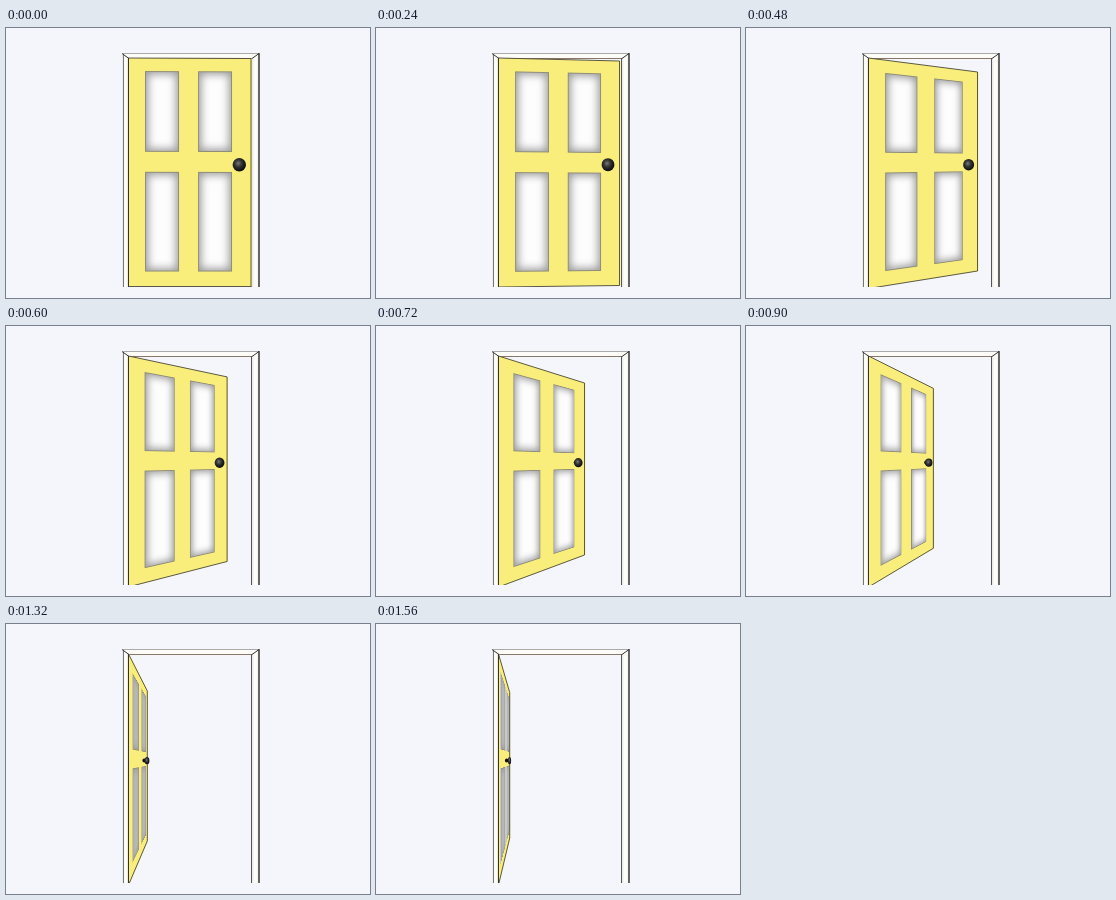
An HTML page that plays this animation: 364 px wide and 270 px high, repeating every 2.22 s.

```html
<!DOCTYPE html>
<html lang="en">
<head>
<meta charset="utf-8">
<title>Opening door</title>
<style>
  html, body { margin: 0; width: 100%; height: 100%; overflow: hidden; background: #f4f6fb; }
  #stage { position: absolute; left: 0; top: 0; width: 364px; height: 259px; overflow: hidden; }
  svg { position: absolute; left: 0; top: 0; }
  #door { position: absolute; left: 122.5px; top: 30px; width: 122.5px; height: 229px; background: #f9ee7c; transform-origin: 0 0; }
  #door i {
    position: absolute; box-sizing: border-box; width: 34px; border: 1px solid #8f8c78;
    background: var(--glass);
    box-shadow: inset 0 0 9px 2px #999, 9px 0 var(--smear), -9px 0 var(--smear);
  }
  .left { left: 15.5px; } .right { left: 69px; }
  .upper { top: 13px; height: 81px; } .lower { top: 114px; height: 100px; }
</style>
</head>
<body>
<div id="stage">
  <svg width="364" height="259" fill="none">
    <defs>
      <linearGradient id="jamb">
        <stop offset="0" stop-color="#e4e2dc"/><stop offset=".4" stop-color="#fff"/>
        <stop offset=".7" stop-color="#fdfbf5"/><stop offset="1" stop-color="#d5d2ca"/>
      </linearGradient>
    </defs>
    <path d="M116.5 25.5H253.5L246 30.5H122.5Z" fill="#fdfcf9"/>
    <path d="M116.5 25.5L122.5 30.5V259H116.5Z" fill="url(#jamb)"/>
    <path d="M253.5 25.5L245.5 30.5V259H253.5Z" fill="url(#jamb)"/>
    <path d="M117 25.5H253" stroke="#aaa"/>
    <path d="M122 30.5H246" stroke="#8a7768"/>
    <path d="M117.5 27V259" stroke="#777"/>
    <path d="M245.5 30V259" stroke="#555"/>
    <path d="M253 25V259" stroke="#222" stroke-width="1.3"/>
    <path d="M116 25.5L123 30.5M253 25.5L246 30.5" stroke="#333"/>
  </svg>
  <div id="door">
    <i class="left upper"></i><i class="right upper"></i>
    <i class="left lower"></i><i class="right lower"></i>
  </div>
  <svg width="364" height="259" fill="none">
    <defs>
      <radialGradient id="shine" cx=".42" cy=".4" r=".6">
        <stop offset="0" stop-color="#777"/><stop offset=".45" stop-color="#333"/><stop offset="1" stop-color="#0a0a0a"/>
      </radialGradient>
    </defs>
    <path id="outline" stroke="#4a4838" stroke-width=".9"/>
    <path d="M122.5 30V259" stroke="#333"/>
    <ellipse id="stem" rx="1.8" ry="1.9" fill="#111"/>
    <ellipse id="knob" fill="url(#shine)"/>
  </svg>
</div>
<script>
const HINGE = 122.5, TOP = 30, WIDTH = 122.5, HEIGHT = 229, STEP = 60, LAST = 26, LOOP = 2220;
// step, free edge x, its top, its bottom, hinge bottom, knob x, knob rx, knob ry
const KEYS = [
  [0, 245, 30.5, 258.5, 258.5, 233.3, 6.7, 6.7],
  [4, 243.5, 33, 257.5, 259, 232, 6.4, 6.5],
  [8, 231.5, 44, 243, 260.5, 222.6, 5.5, 5.8],
  [12, 208.5, 57, 229, 261, 202.3, 4.3, 4.6],
  [18, 166, 66, 217.5, 261, 163, 3.1, 3.8],
  [22, 141.3, 67, 217, 261, 141, 2.4, 3.6],
  [26, 133.7, 68.5, 214, 261, 133.5, 1.6, 3.6]
];
const $ = id => document.getElementById(id);
const set = (id, attrs) => { for (const k in attrs) $(id).setAttribute(k, attrs[k]); };
const clamp = v => Math.max(0, Math.min(1, v));

function slope(i, col) {
  const a = KEYS[i - 1], b = KEYS[i + 1];
  return a && b ? (b[col] - a[col]) / (b[0] - a[0]) : 0;
}

// Cubic Hermite curve through the keys
function value(step, col) {
  let i = 0;
  while (i < KEYS.length - 2 && step >= KEYS[i + 1][0]) i++;
  const a = KEYS[i], b = KEYS[i + 1], span = b[0] - a[0], u = (step - a[0]) / span, v = 1 - u;
  return v * v * (1 + 2 * u) * a[col] + u * u * (3 - 2 * u) * b[col]
    + span * u * v * (v * slope(i, col) - u * slope(i + 1, col));
}

function draw(step) {
  const [x, top, bottom, foot, kx, rx, ry] = [1, 2, 3, 4, 5, 6, 7].map(col => value(step, col));
  const depth = (foot - TOP) / (bottom - top);
  const sx = (x - HINGE) * depth / WIDTH, skew = (top - TOP) * depth / WIDTH;
  const persp = (depth - 1) / WIDTH, sy = (foot - TOP) / HEIGHT;
  const door = $('door').style;
  door.transform = `matrix3d(${sx},${skew},0,${persp},0,${sy},0,0,0,0,1,0,0,0,0,1)`;
  const light = 253 - 70 * clamp((step - 18) / 4);
  door.setProperty('--glass', `rgb(${light},${light},${light})`);
  door.setProperty('--smear', `rgba(200,200,198,${clamp((step - 22) / 4)})`);
  set('outline', { d: `M${HINGE} ${TOP}L${x} ${top}V${bottom}L${HINGE} ${foot}` });
  set('knob', { cx: kx, cy: 136.7, rx, ry });
  set('stem', { cx: kx - 2.8, cy: 136.5 });
}

function tick() {
  draw(Math.min(LAST, Math.floor(performance.now() % LOOP / STEP)));
  requestAnimationFrame(tick);
}
tick();
</script>
</body>
</html>
```
